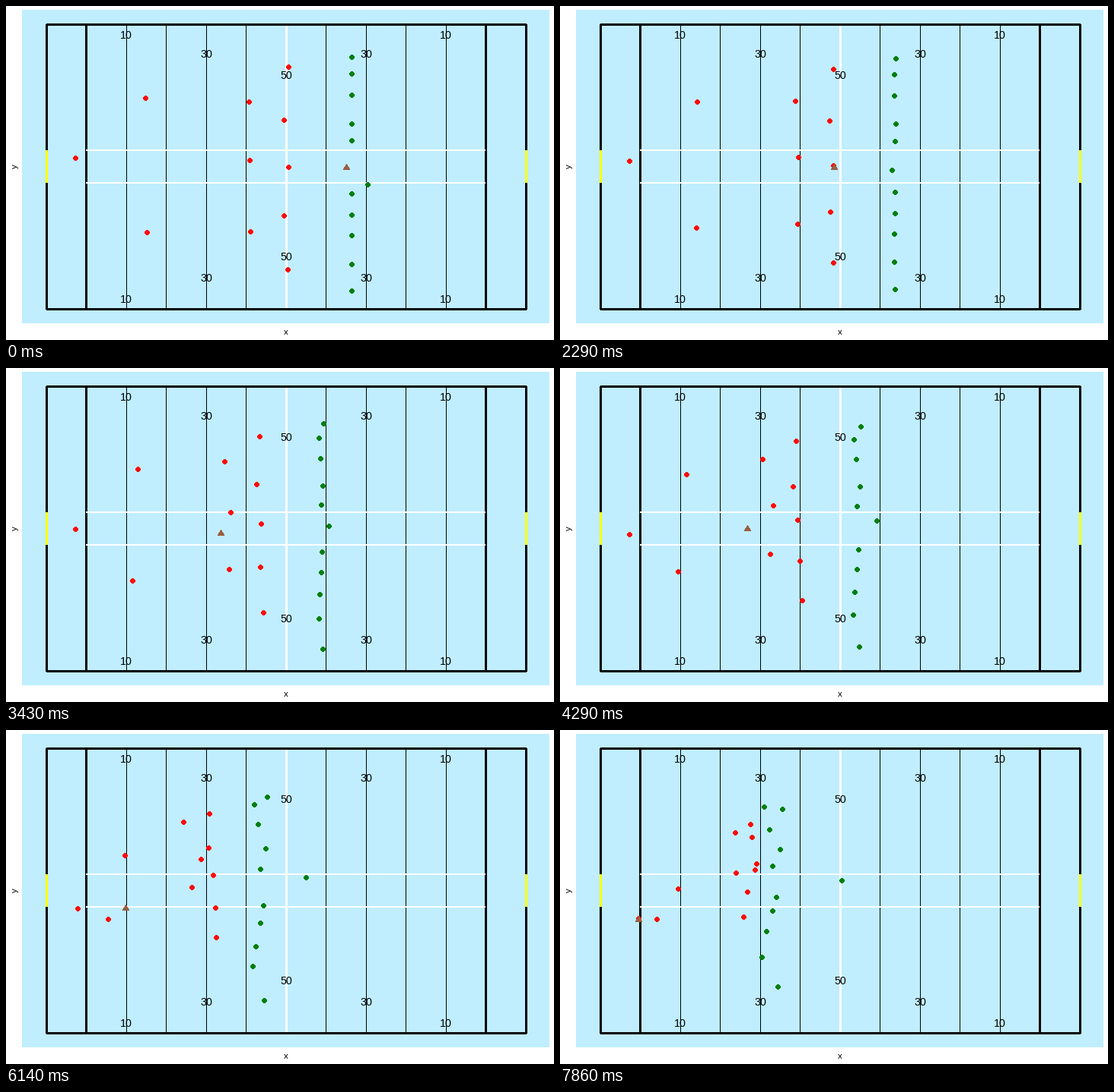
Animation of 720x440 px, one loop 8000 ms. Source, as a matplotlib script:

```python
import numpy as np
import matplotlib.pyplot as plt
from matplotlib.animation import FuncAnimation
from matplotlib.patches import Circle, Polygon, Rectangle

W, H = 720, 440
LOOP, TICK, STEPS = 8000, 20, 56  # the picture moves in 56 steps per loop
FONT = "Liberation Sans"
PX = 0.72  # points per pixel at 100 dpi

# receiving side: start, end, sideways bend of the run
REDS = np.array([
    (183, 121, 155, 209, -8, -18),
    (185, 298, 127, 249, -11, -15),
    (91, 200, 103, 248, -6, 1),
    (319, 126, 230, 135, -25, -12),
    (371, 80, 250, 124, -20, -1),
    (365, 150, 252, 141, -21, 12),
    (320, 203, 258, 176, -22, -15),
    (371, 212, 256, 184, -20, -2),
    (321, 297, 231, 188, -15, -14),
    (365, 276, 246, 213, -7, 2),
    (370, 347, 241, 246, -4, -4),
], float)

# kicking side lines up on one x: start y, end, bend in y
LINE_X, LINE_BEND = 453.5, 2.7
GREENS = np.array([(LINE_X, y0, x1, y1, LINE_BEND, by) for y0, x1, y1, by in (
    (67, 292, 104, -5),
    (89, 268, 101, 1),
    (117, 275, 131, -3),
    (155, 289, 157, 0),
    (177, 279, 179, 5),
    (247, 284, 220, 3),
    (275, 279, 238, 5),
    (302, 271, 265, 9),
    (340, 265, 299, 0),
    (375, 286, 338, 7),
)], float)

# time step, x, y
KICKER = np.array([(0, 475, 235), (8, 470, 231), (16, 436, 216), (24, 424, 208),
                   (36, 407, 195), (55, 370, 198)], float)
BALL = np.array([(11, 447, 212), (16, 360, 212), (24, 282, 217), (30, 246, 211),
                 (36, 210, 219), (43, 157, 234), (55, 103, 249)], float)


def pace(n):
    """Distance run by step n: rest, a soft start near step 15, steady speed."""
    return 4 * np.log1p(np.exp((n - 15) / 4))


def run(rows, n):
    u = (pace(n) - pace(0)) / (pace(STEPS - 1) - pace(0))
    start, end, bend = rows[:, :2], rows[:, 2:4], rows[:, 4:]
    return start + (end - start) * u + bend * 5.4 * u ** 1.5 * (1 - u)


def glide(keys, n):
    """Smooth cubic path through timed points, held before the first."""
    t, p = keys[:, 0], keys[:, 1:]
    m = np.gradient(p, t, axis=0)
    n = np.clip(n, t[0], t[-1])
    i = min(np.searchsorted(t, n, side="right") - 1, len(t) - 2)
    h = t[i + 1] - t[i]
    s = (n - t[i]) / h
    return ((1 + 2 * s) * (1 - s) ** 2 * p[i] + s * (1 - s) ** 2 * h * m[i]
            + s * s * (3 - 2 * s) * p[i + 1] + s * s * (s - 1) * h * m[i + 1])


def snap(p):
    return np.floor(p + 0.5) + 0.5


fig = plt.figure(figsize=(7.2, 4.4), dpi=100, facecolor="white")
ax = fig.add_axes([0, 0, 1, 1])
ax.set_xlim(0, W)
ax.set_ylim(H, 0)
ax.axis("off")


def box(x0, y0, x1, y1, color):
    ax.add_patch(Rectangle((x0, y0), x1 - x0, y1 - y0, fc=color, lw=0, aa=False))


def label(x, y, s, size, **kw):
    ax.text(x, y, s, fontsize=size * PX, family=FONT, color="black", ha="center", **kw)


def dot(color):
    return ax.add_patch(Circle((0, 0), 2.9, fc=color, lw=0, aa=False, zorder=4))


# field
box(21, 5, 714, 418, "#c0eeff")
for k in range(1, 10):
    x = int(105.5 + 52.5 * k)
    box(x, 24, x + 1, 400, "black")
for x in (52, 104, 629, 682):
    box(x, 24, x + 3, 400, "black")
for y in (23, 398):
    box(53, y, 684, y + 3, "black")
box(367, 26, 370, 398, "white")
for y in (189, 232):
    box(105, y, 630, y + 2, "white")
for x in (52, 682):
    box(x, 190, x + 3, 233, "yellow")

for num, top, bottom in ((10, 43, 391), (30, 68, 363), (50, 96, 335)):
    for x in {368 - 5.25 * (50 - num), 368 + 5.25 * (50 - num)}:
        for y in (top, bottom):
            label(x, y, str(num), 14.2, va="baseline")
label(368, 433, "x", 11.5, va="baseline")
label(11.5, 211.5, "y", 11.5, va="center", rotation=90)

reds = [dot("#ff0a0a") for _ in REDS]
greens = [dot("#007f10") for _ in GREENS]
kicker = dot("#007f10")
TRI = np.array([(0, -3.9), (4.2, 2.9), (-4.2, 2.9)])
ball = ax.add_patch(Polygon(TRI, fc="#9a6040", lw=0, aa=False, zorder=5))


def update(tick):
    n = min((tick * TICK + TICK / 2) * STEPS // LOOP, STEPS - 1)
    for dots, rows in ((reds, REDS), (greens, GREENS)):
        for d, pos in zip(dots, snap(run(rows, n))):
            d.set_center(pos)
    kicker.set_center(snap(glide(KICKER, n)))
    ball.set_xy(TRI + snap(glide(BALL, n)))
    return reds + greens + [kicker, ball]


anim = FuncAnimation(fig, update, frames=LOOP // TICK, interval=TICK,
                     repeat=True, repeat_delay=0, blit=False)
plt.show()
```
